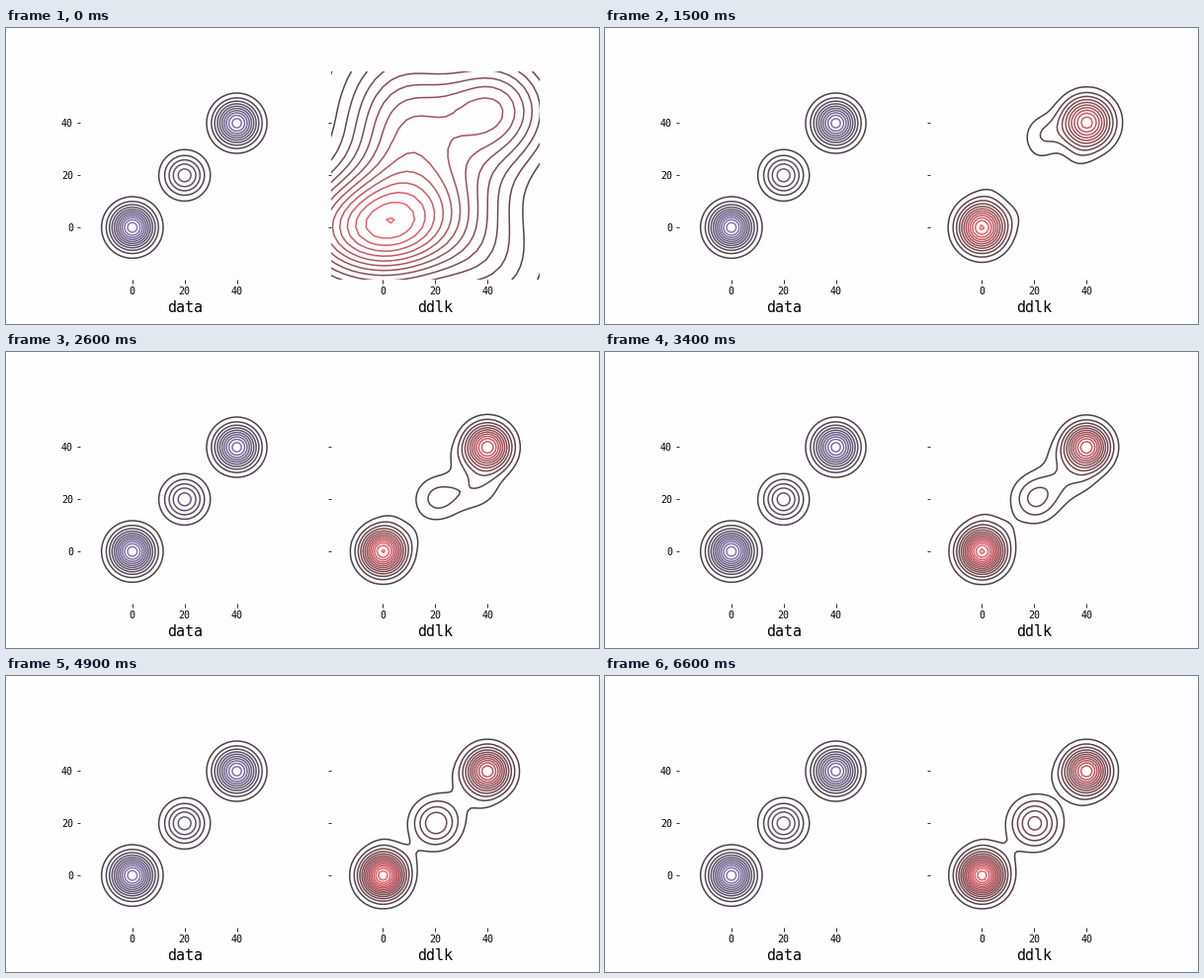
A matplotlib script for the animation above (6700 ms loop, 600 by 300 pixels).

```python
import numpy as np
import matplotlib.pyplot as plt
from matplotlib.animation import FuncAnimation
from matplotlib.colors import LinearSegmentedColormap

W, H, DPI = 600, 300, 72
FRAMES, INTERVAL = 67, 100
PAPER, DARK = "#fefdff", "#4a4146"
PURPLE = LinearSegmentedColormap.from_list("purple", [DARK, "#8a78b8"])
RED = LinearSegmentedColormap.from_list("red", [DARK, "#f4626a"])

plt.rcParams.update({"font.family": "DejaVu Sans Mono", "font.size": 10})


def gauss(x, y, w, cx, cy, sx, sy=None):
    sy = sy or sx
    return w * np.exp(-((x - cx) / sx) ** 2 / 2 - ((y - cy) / sy) ** 2 / 2)


def ramp(t, start, end):
    p = np.clip((t - start) / (end - start), 0, 1)
    return p * p * (3 - 2 * p)


def decay(t, start, end, tau):
    return end + (start - end) * np.exp(-t / tau)


def mesh(step):
    ticks = np.arange(-24, 64 + step, step)
    return np.meshgrid(ticks, ticks)


def draw_contours(ax, x, y, z, cmap):
    top = z.max()
    return ax.contour(x, y, z, levels=np.arange(1, int(top) + 1),
                      cmap=cmap, vmin=1, vmax=top, linewidths=1.5)


def blobs(t, x, y):
    """The three modes: two shrink into place, the middle one grows later."""
    low = gauss(x, y, 12.2 + 2.6 * ramp(t, 15, 42),
                decay(t, -1, 0, 5), decay(t, -0.5, 0, 5),
                decay(t, 22, 5.5, 3.7), decay(t, 14.5, 5.5, 5))
    high = gauss(x, y, 7.6 + 4.3 * ramp(t, 6, 20),
                 decay(t, 43, 40, 5), decay(t, 45, 40, 5),
                 decay(t, 15, 5.5, 6))
    grown = np.clip((t - 14) / 40, 0, 1) ** 0.8
    return low + high + gauss(x, y, 5.5 * grown, 20.2, 20, 6)


def haze(t, x, y):
    """Broad mass of the untrained model, gone within a few steps."""
    return np.exp(-t / 2) * (gauss(x, y, 7.2, 8, 38, 16, 22)
                             + gauss(x, y, 2.5, 30, 14, 16, 14)
                             + gauss(x, y, 2.0, 42, -14, 14))


def bridge(t, x, y):
    """Loose mass swinging across the diagonal before it joins the middle."""
    swing = -np.cos(2 * np.pi * (t - 15) / 27)
    w = 1.6 * ramp(t, 5, 14) * (1 - ramp(t, 35, 56))
    return gauss(x, y, w, 28.5 + 6 * swing, 28.5 - 6 * swing,
                 6.5 + 1.5 * swing, 6)


def satellites(t, x, y):
    """Small bumps that dent the outlines of the two main modes."""
    rng = np.random.default_rng(t)
    radius = decay(t, 34.5, 12.5, 5)
    w = decay(t, 0.8, 0.3, 25) * (1 - np.exp(-t / 5))
    z = 0
    for centre, angles in ((0, (85, 10 + t / 2)), (40, (190, 265))):
        for angle in angles:
            a = np.radians(angle + rng.normal(0, 5))
            z = z + gauss(x, y, w * rng.uniform(0.8, 1.2),
                          centre + radius * np.cos(a),
                          centre + radius * np.sin(a), 4.3)
    return z


def panel(left, name):
    side = 211.36
    ax = fig.add_axes([left / W, 45 / H, side / W, side / H])
    ax.set(xlim=(-20, 60), ylim=(-20, 60),
           xticks=[0, 20, 40], yticks=[0, 20, 40])
    ax.patch.set_visible(False)
    ax.spines[:].set_visible(False)
    ax.set_xlabel(name, fontsize=15)
    return ax


fig = plt.figure(figsize=(W / DPI, H / DPI), dpi=DPI, facecolor=PAPER)
data_ax = panel(75, "data")
model_ax = panel(328.64, "ddlk")
model_ax.tick_params(labelleft=False)

gx, gy = mesh(0.4)
mixture = sum(gauss(gx, gy, 27.8 * share, c, c, 5.32)
              for share, c in ((0.42, 0), (0.2, 20), (0.38, 40)))
draw_contours(data_ax, gx, gy, mixture, PURPLE)

drawn = []


def update(t):
    while drawn:
        drawn.pop().remove()
    # The grid tightens as the samples stop spreading.
    x, y = mesh(decay(t, 3, 1.25, 6))
    z = sum(part(t, x, y) for part in (blobs, haze, bridge, satellites))
    drawn.append(draw_contours(model_ax, x, y, z, RED))
    return drawn


anim = FuncAnimation(fig, update, frames=FRAMES, interval=INTERVAL,
                     init_func=lambda: update(0), repeat=True, repeat_delay=0,
                     blit=False)
plt.show()
```
